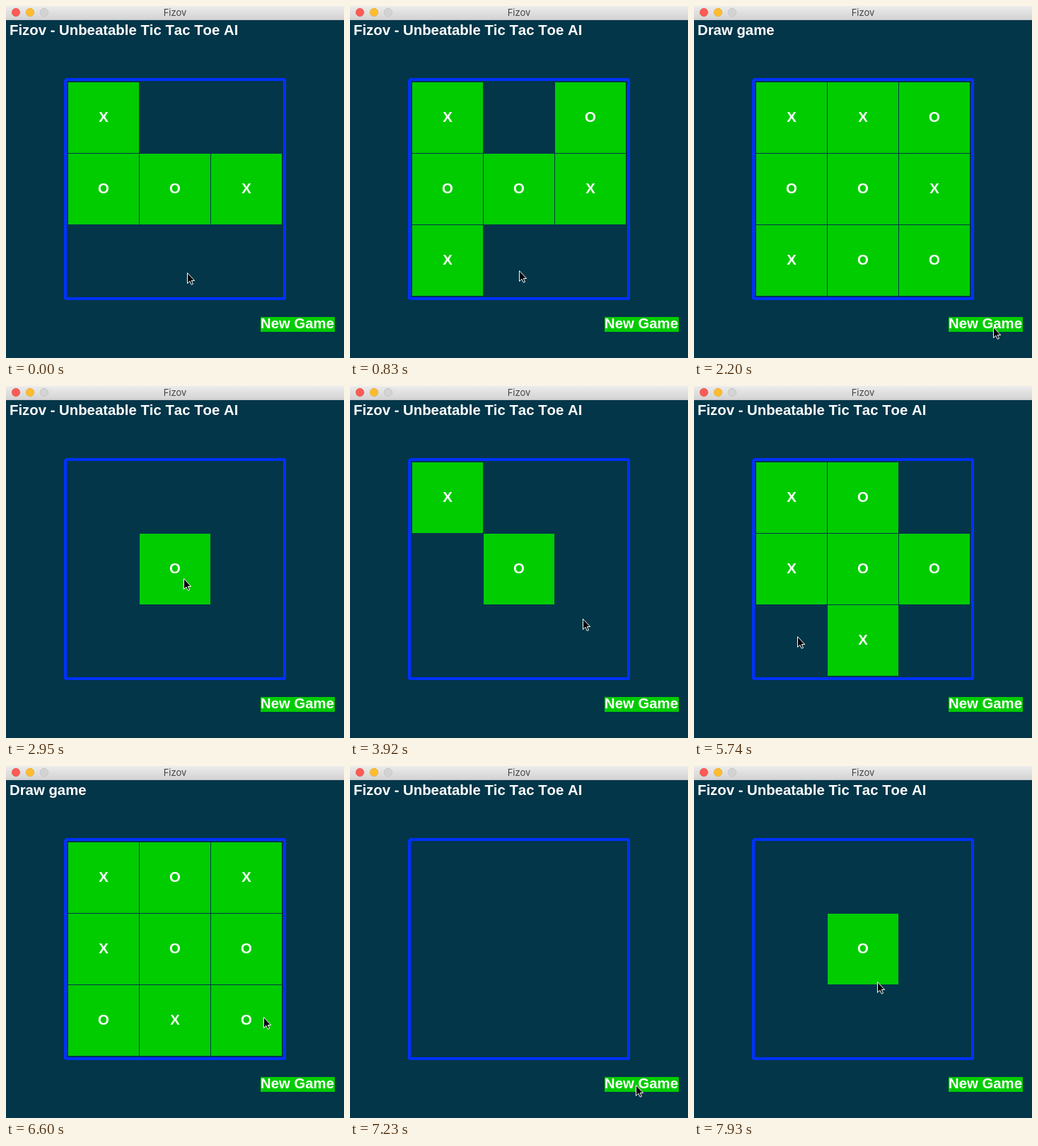
These frames come from a looping animation (478x498 px, 7990 ms). An HTML page:

```html
<!DOCTYPE html>
<html lang="en">
<head>
<meta charset="utf-8">
<title>Fizov</title>
<style>
  html, body { margin: 0; width: 100%; height: 100%; overflow: hidden; background: #033649; }
  svg { display: block; width: 100%; height: 100%; }
  .game { font: bold 20.35px "Liberation Sans", Arial, sans-serif; font-kerning: none; fill: #fff; }
  .bar { font: 13px Inter, Roboto, sans-serif; fill: #444; }
  .mid { text-anchor: middle; }
</style>
</head>
<body>
<svg viewBox="0 0 478 498">
  <defs>
    <linearGradient id="chrome" x2="0" y2="1">
      <stop offset="0" stop-color="#ececec"/>
      <stop offset="1" stop-color="#d2d2d2"/>
    </linearGradient>
  </defs>
  <rect width="478" height="498" fill="#033649"/>
  <rect width="478" height="20" fill="url(#chrome)"/>
  <rect y="19" width="478" height="1" fill="#c4c4c4"/>
  <circle cx="14" cy="9" r="5.7" fill="#fc5b55" stroke="#e2463f" stroke-width=".6"/>
  <circle cx="34" cy="9" r="5.7" fill="#fdbc2f" stroke="#e0a123" stroke-width=".6"/>
  <circle cx="54" cy="9" r="5.7" fill="#d3d3d3" stroke="#c0c0c0" stroke-width=".8"/>
  <text class="bar mid" x="239" y="14">Fizov</text>
  <text class="game" id="status" x="5" y="41"></text>
  <path d="M84 104H395M84 414H395M84 104V415M394 104V415" stroke="#0032ff" stroke-width="4"/>
  <g id="board"></g>
  <rect x="360" y="440" width="105" height="21" fill="#00cc00"/>
  <text class="game" x="360" y="456">New Game</text>
  <path id="cursor" d="M.5 .6V15.5L3.9 12.3L6.3 17.3L8.5 16.3L6.3 11.5H10.7Z" fill="#000" stroke="#fff" stroke-linejoin="round"/>
</svg>
<script>
const LOOP = 7990;
const TITLE = "Fizov - Unbeatable Tic Tac Toe AI";
const LEFT = 88, TOP = 108, PITCH = 101;
const CLICK = true;

// Pointer stops: arrival, x, y, rest, and whether the rest ends in a click.
const stops = [
  [0, 256, 377, 60],
  [380, 330, 168, 60, CLICK],
  [830, 239, 374, 140, CLICK],
  [1150, 355, 406, 240, CLICK],
  [2190, 423, 454, 250, CLICK],
  [2860, 248, 268, 60, CLICK],
  [3220, 337, 396, 490],
  [3920, 329, 329, 20],
  [4160, 262, 178, 40, CLICK],
  [4660, 184, 355, 0],
  [5040, 328, 272, 150, CLICK],
  [5740, 146, 354, 180, CLICK],
  [6440, 352, 352, 70, CLICK],
  [6600, 364, 355, 0],
  [6710, 391, 396, 0],
  [7020, 404, 451, 210, CLICK],
  [7410, 404, 451, 0],
  [7760, 251, 270, 30, CLICK],
  [7930, 259, 305, 60]
].map(([at, x, y, rest, click]) => ({ at, x, y, leave: at + rest, click }));

const $ = id => document.getElementById(id);
const make = (tag, parent, attrs) => {
  const el = document.createElementNS("http://www.w3.org/2000/svg", tag);
  for (const name in attrs) el.setAttribute(name, attrs[name]);
  return parent.appendChild(el);
};
const indices = [...Array(9).keys()];

const cells = indices.map(i => {
  const x = LEFT + i % 3 * PITCH, y = TOP + Math.floor(i / 3) * PITCH;
  const group = make("g", $("board"), {});
  make("rect", group, { x, y, width: 100, height: 100, fill: "#00cc00" });
  const label = make("text", group, { x: x + 50, y: y + 56, class: "game mid" });
  return { group, label };
});

const lines = [0, 1, 2].flatMap(i => [[3 * i, 3 * i + 1, 3 * i + 2], [i, i + 3, i + 6]])
  .concat([[0, 4, 8], [2, 4, 6]]);

// The machine blocks a line that O could finish, or takes the first free cell.
function reply(board) {
  const free = indices.filter(i => !board[i]);
  const threat = i => lines.some(line =>
    line.includes(i) && line.every(j => j === i || board[j] === "O"));
  return free.find(threat) ?? free[0];
}

// Play all clicks once and keep the board after each change.
const history = [];
let board = Array(9).fill("");

function mark(time, cell, sign) {
  board = board.with(cell, sign);
  history.push({ time, board });
}

function playerMove(time, cell) {
  const thinking = board.some(Boolean) ? 110 : 570;
  mark(time, cell, "O");
  const answer = reply(board);
  if (answer !== undefined) mark(time + thinking, answer, "X");
}

function clickAt({ leave, x, y }) {
  if (y > 440) {
    board = Array(9).fill("");
    history.push({ time: leave, board });
  } else {
    playerMove(leave, Math.floor((y - TOP) / PITCH) * 3 + Math.floor((x - LEFT) / PITCH));
  }
}

for (const cell of [3, 4]) playerMove(-1000, cell);
stops.filter(s => s.click).forEach(clickAt);

function pointer(t) {
  const i = stops.findLastIndex(s => t >= s.at);
  const from = stops[i], to = stops[i + 1] || from;
  if (t <= from.leave || to === from) return from;
  const u = (t - from.leave) / (to.at - from.leave);
  const ease = u * u * (3 - 2 * u);
  return { x: from.x + (to.x - from.x) * ease, y: from.y + (to.y - from.y) * ease };
}

function render(t) {
  const now = history.findLast(h => t >= h.time).board;
  cells.forEach(({ group, label }, i) => {
    group.style.display = now[i] ? "" : "none";
    label.textContent = now[i];
  });
  $("status").textContent = now.every(Boolean) ? "Draw game" : TITLE;
  const { x, y } = pointer(t);
  $("cursor").setAttribute("transform", `translate(${Math.round(x)} ${Math.round(y)})`);
}

const begin = performance.now();
function tick() {
  render((performance.now() - begin) % LOOP);
  requestAnimationFrame(tick);
}
tick();
</script>
</body>
</html>
```
